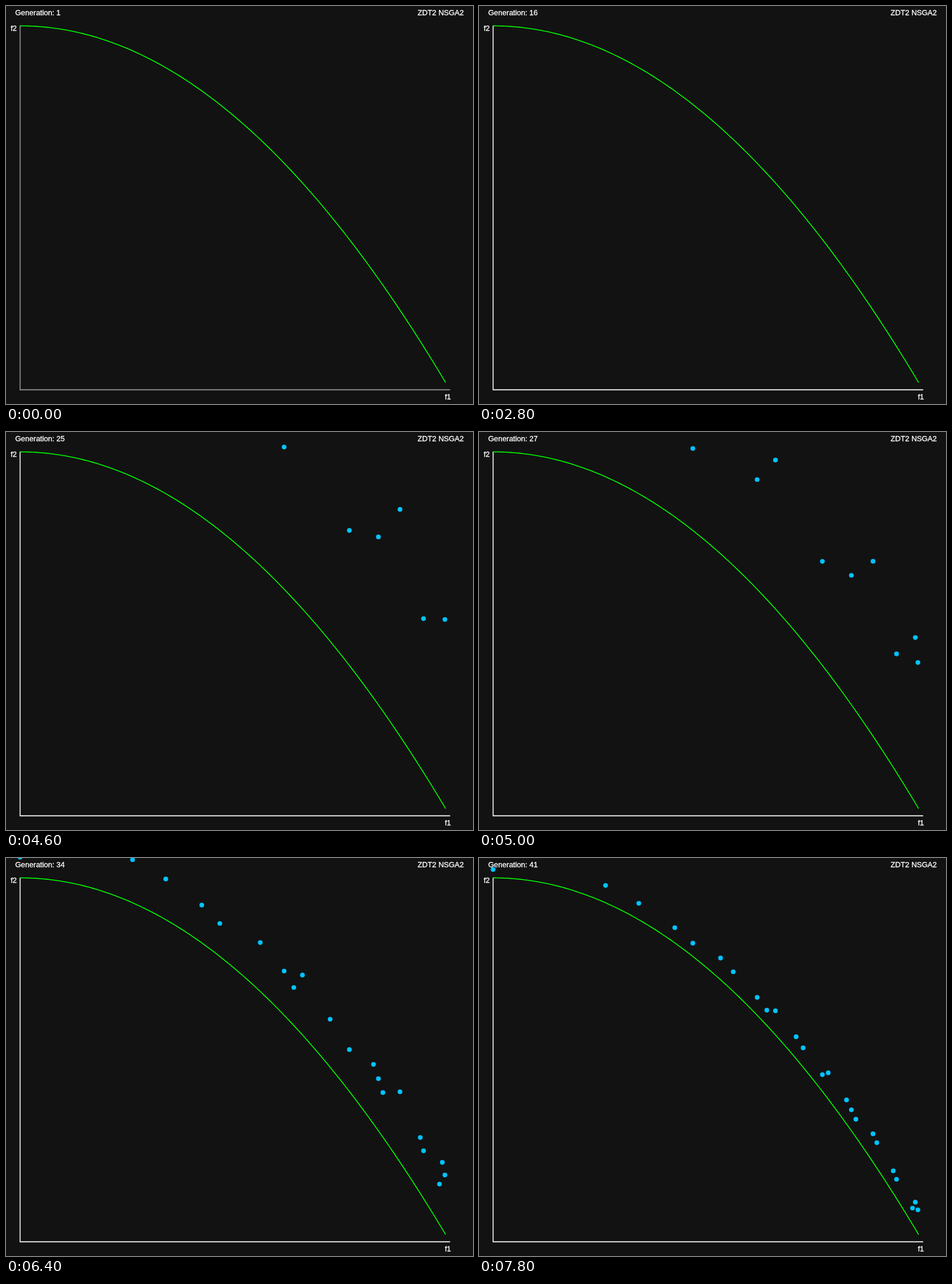
These frames come from a looping animation (811 by 690 pixels, 8000 ms). An HTML page:

```html
<!DOCTYPE html>
<html lang="en">
<head>
<meta charset="utf-8">
<title>ZDT2 NSGA2</title>
<style>
  html, body { margin: 0; width: 100%; height: 100%; overflow: hidden; background: #121212; }
  svg { display: block; width: 811px; height: 690px; }
  text { font: 13px "Liberation Sans", Arial, sans-serif; fill: #fff; stroke: #fff; stroke-width: .35; }
</style>
</head>
<body>
<svg viewBox="0 0 811 690">
  <rect width="811" height="690" fill="#121212"/>
  <path id="axes" d="M24.5 34V665.4H771.3" fill="none" stroke-width="1.6"/>
  <path id="curve" fill="none" stroke="#0f0" stroke-width="1.6"/>
  <g id="dots" fill="#00c3ff"></g>
  <text id="gen" x="16" y="16.3"></text>
  <text x="795" y="16.3" text-anchor="end">ZDT2 NSGA2</text>
  <text x="8" y="43">f2</text>
  <text x="762" y="682">f1</text>
</svg>
<script>
const STEP = 200, LOOP = 8000;
const LEFT = 24.4, TOP = 34.4, W = 746.5, H = 631;
const COUNT = 24;
const $ = id => document.getElementById(id);

const px = f => LEFT + W * f;
const front = f => TOP + H * f * f;
const frac = v => v % 1;
const clamp = v => Math.min(1, Math.max(0, v));

// Each individual keeps its f1 and joins the population at its own step.
const dots = Array.from({ length: COUNT }, (_, i) => ({
  f: clamp((i / (COUNT - 1)) ** 0.43 + (i && 0.03 * (frac(i * 0.57) - 0.5))),
  spread: 0.7 + 0.6 * frac(i * 0.7548 + 0.15),
  birth: 17 + 18 * frac(i * 0.618 + 0.8)
}));

// The population sinks towards the ideal front, ever more slowly.
function population(step) {
  const gap = 624 * Math.exp(-0.13 * (step - 18));
  return dots
    .filter(d => step >= d.birth)
    .map(d => [px(d.f), front(d.f) - gap * d.spread * (0.45 + 0.55 * d.f)])
    .filter(([, y]) => y > -5);
}

function draw(step) {
  $("gen").textContent = "Generation: " + (step ? step + 2 : 1);
  $("axes").setAttribute("stroke", step ? "#fff" : "#999");
  $("dots").innerHTML = population(step)
    .map(([x, y]) => `<circle cx="${x.toFixed(1)}" cy="${y.toFixed(1)}" r="4.1"/>`).join("");
}

$("curve").setAttribute("d", "M" + Array.from({ length: 100 }, (_, i) =>
  px(i / 100).toFixed(2) + " " + front(i / 100).toFixed(2)).join("L"));

const start = performance.now();
let shown = -1;
function tick() {
  const step = Math.floor((performance.now() - start) % LOOP / STEP);
  if (step !== shown) draw(shown = step);
  requestAnimationFrame(tick);
}
tick();
</script>
</body>
</html>
```
